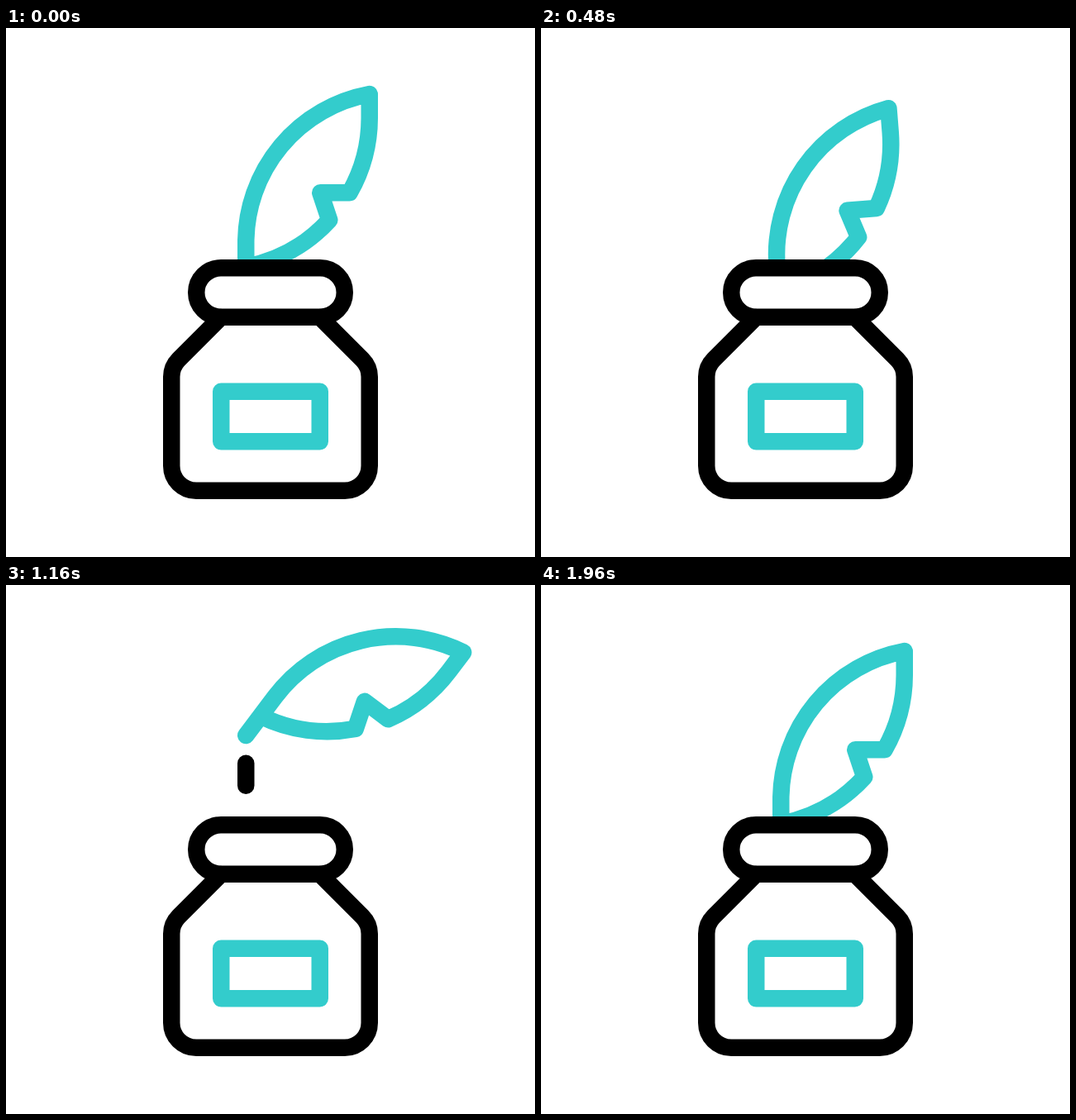
An HTML page that plays this animation: 640x640 px, repeating every 2000 ms.

```html
<!DOCTYPE html>
<html lang="en">
<head>
<meta charset="utf-8">
<title>Quill and inkwell</title>
<style>
  html, body { margin: 0; width: 100%; height: 100%; overflow: hidden; background: #fff; }
  svg { display: block; width: 100vw; height: 100vh; }
  .ink, .teal { fill: none; stroke-width: 20.5; stroke-linecap: round; stroke-linejoin: round; }
  .ink { stroke: #000; }
  .teal { stroke: #3cc; }
</style>
</head>
<body>
<svg viewBox="0 0 640 640">
  <clipPath id="above"><rect width="640" height="290"/></clipPath>
  <g clip-path="url(#above)">
    <path id="drop" class="ink"/>
    <!-- the nib is the feather's local origin -->
    <path id="feather" class="teal" d="M0 0V-58.5A183 183 0 0 1 149.5 -238.5V-209.5
      A183 183 0 0 1 125.5 -119.3H90L101 -86.2A183 183 0 0 1 0 -29.5"/>
  </g>
  <path class="ink" d="M260 350L209 401A30 30 0 0 0 200.25 422V529.75A30 30 0 0 0 230.25 559.75
    H409.75A30 30 0 0 0 439.75 529.75V422A30 30 0 0 0 431 401L380 350"/>
  <rect class="ink" x="230.25" y="290.25" width="179.5" height="59.5" rx="29.75"/>
  <rect class="teal" x="260.25" y="439.75" width="119.5" height="60.5"/>
</svg>
<script>
  const LOOP = 2000, STEP = 40;
  const REST = { y: 318.5, angle: 0 };
  const DIPPED = { y: 368.5, angle: -8 };
  const RAISED = { y: 182, angle: 37 };
  const DROP_START = 920, RIM_Y = 289;

  const mix = (a, b, u) => a + (b - a) * u;

  // Eased progress from 0 to 1 between two times.
  function ramp(t, from, to) {
    const u = Math.min(1, Math.max(0, (t - from) / (to - from)));
    return u * u * (3 - 2 * u);
  }

  // Down, up, then down again and held.
  function dip(t) {
    const u = Math.min(1, Math.max(0, (t - 80) / 472));
    return (1 - Math.cos(3 * Math.PI * u)) / 2;
  }

  // The turn lags slightly behind the lift, so each passes its own end of the rise.
  function pose(key, t, riseEnd) {
    const dipped = mix(REST[key], DIPPED[key], dip(t));
    const raised = mix(dipped, RAISED[key], ramp(t, 645, riseEnd));
    return mix(raised, REST[key], ramp(t, 1557, 1957));
  }

  const feather = document.getElementById("feather");
  const drop = document.getElementById("drop");

  function draw(t) {
    feather.setAttribute("transform",
      `translate(290.25 ${pose("y", t, 919)}) rotate(${pose("angle", t, 942)})`);

    const head = mix(RAISED.y, RIM_Y, ramp(t, DROP_START, 1360));
    const tail = mix(RAISED.y, RIM_Y, ramp(t, DROP_START, 1560));
    drop.setAttribute("d", `M290.25 ${tail}V${head}`);
    drop.setAttribute("visibility", t < DROP_START ? "hidden" : "visible");
  }

  const start = performance.now();
  function tick() {
    const t = (performance.now() - start) % LOOP;
    draw(Math.floor(t / STEP) * STEP);
    requestAnimationFrame(tick);
  }
  tick();
</script>
</body>
</html>
```
